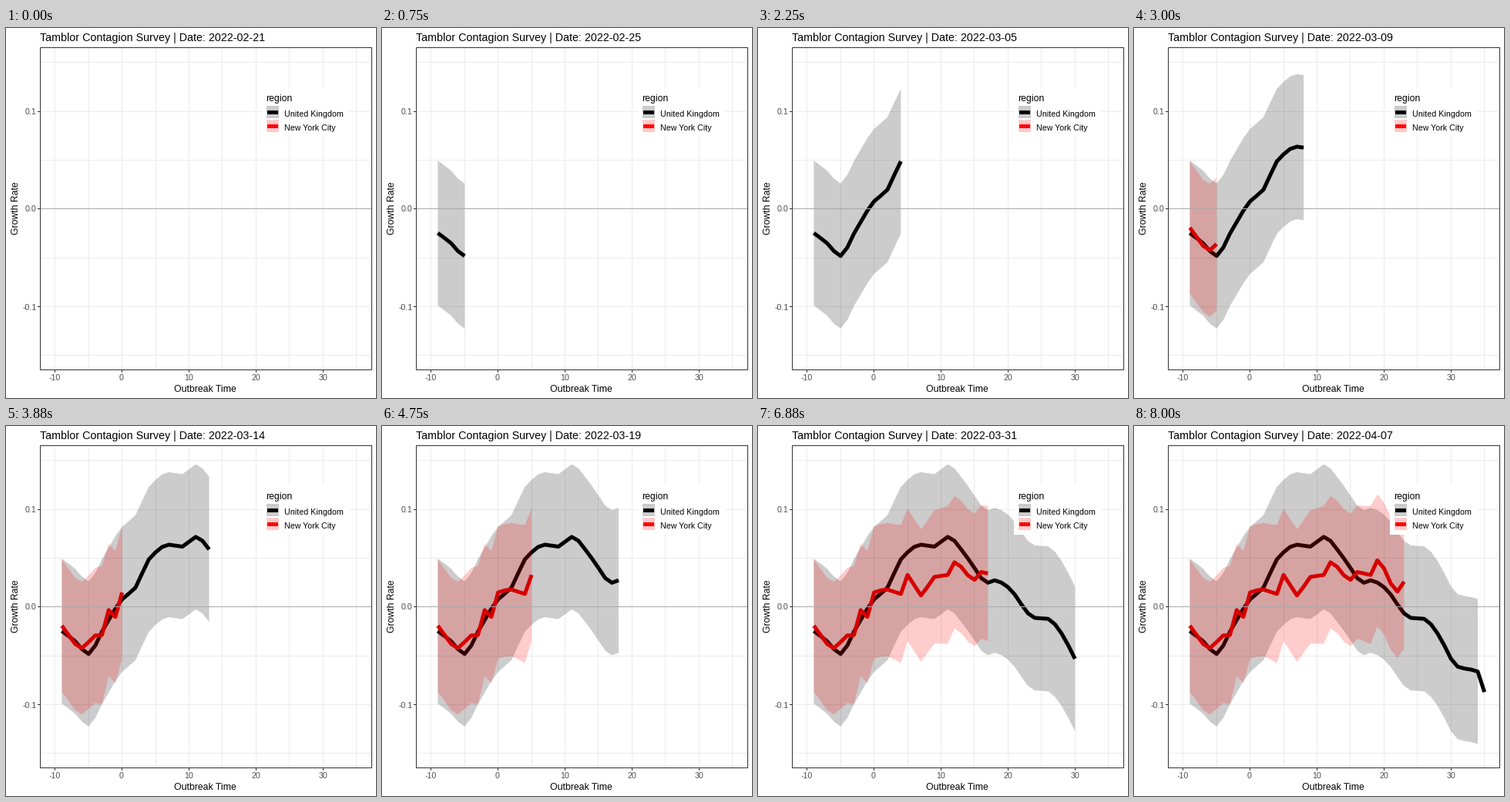
Animation, 480 px wide and 480 px high, one loop 8130 ms. Source, as a matplotlib script:

```python
import numpy as np
import matplotlib.pyplot as plt
from matplotlib.animation import FuncAnimation
from matplotlib.patches import Polygon, Rectangle

SIZE, DPI = 480, 96
PT = 72 / DPI  # points per pixel
LOOP, TICK, POSE = 8130, 30, 125  # ms
DAYS, LAST_POSE = 45, 64

plt.rcParams["font.family"] = "Liberation Sans"
plt.rcParams["path.snap"] = False

# Turning points as (outbreak time, growth rate in thousandths)
UK = [(-9, -24.5), (-7, -35), (-5, -48), (-3, -25), (0, 8), (2, 20), (4, 49),
      (7, 64), (9, 62), (11, 72), (14, 50), (17, 25), (18, 27.5), (20, 20.5),
      (24, -11), (26, -12), (28, -27), (31, -61), (34, -66), (35, -87)]
NYC = [(-9, -19), (-6, -42), (-4, -29), (-3, -28.5), (-2, -3), (-1, -10),
       (0, 15), (2, 18), (4, 13.5), (5, 33), (7, 12), (9, 31), (11, 33),
       (12, 46), (15, 28), (16, 36), (18, 33), (19, 48), (22, 16), (23, 26)]

# Each day lands on a whole pose; positions between are interpolated
DAY_POSE = np.round(np.arange(DAYS + 1) * LAST_POSE / DAYS)


def col(time):
    return 150.1 + 8.687 * time


def row(rate):
    return 234.5 - 1.266 * rate


def daily(keys):
    """Daily values of a monotone cubic through the turning points."""
    x, y = np.array(keys, float).T
    h = np.diff(x)
    slope = np.diff(y) / h
    a, b = slope[:-1], slope[1:]
    same = a * b > 0
    m = np.r_[slope[0], np.where(same, 2 * a * b / np.where(same, a + b, 1), 0),
              slope[-1]]
    t = np.arange(x[0], x[-1] + 1)
    i = np.clip(np.searchsorted(x, t, "right") - 1, 0, len(h) - 1)
    u = (t - x[i]) / h[i]
    ease = u * u * (3 - 2 * u)
    bend = u * (1 - u) * ((1 - u) * m[i] - u * m[i + 1]) * h[i]
    return t, y[i] + (y[i + 1] - y[i]) * ease + bend


fig = plt.figure(figsize=(SIZE / DPI, SIZE / DPI), dpi=DPI, facecolor="white")
ax = fig.add_axes([0, 0, 1, 1])
ax.set_xlim(-0.5, SIZE - 0.5)
ax.set_ylim(SIZE - 0.5, -0.5)
ax.axis("off")


def line(x, y, color, width=1, z=1):
    return ax.plot(x, y, color=color, lw=width * PT, zorder=z,
                   solid_capstyle="butt", solid_joinstyle="round")[0]


def box(x0, y0, x1, y1, z, **style):
    ax.add_patch(Rectangle((x0, y0), x1 - x0, y1 - y0, zorder=z, **style))


def text(x, y, s, size, color="black", z=9, **style):
    style.setdefault("va", "baseline")
    return ax.text(x, y, s, fontsize=size * PT, color=color, zorder=z, **style)


LEFT, TOP, RIGHT, BOTTOM = 44, 25, 474, 443
ZERO = 234

# Grid, axes and frame
for t in range(-10, 36, 5):
    x = round(col(t))
    line([x, x], [TOP, BOTTOM], "#EBEBEB")
    if t % 10 == 0:
        line([x, x], [BOTTOM, BOTTOM + 3.5], "#333333")
        text(x - 0.5, 456.7, str(t), 10.6, "#4D4D4D", ha="center")
for rate in range(-150, 151, 50):
    y = round(row(rate) - 0.1)
    line([LEFT, RIGHT], [y, y], "#EBEBEB")
    if rate % 100 == 0:
        line([LEFT - 3.5, LEFT], [y, y], "#333333")
        text(39, y + 4, f"{rate / 1000:.1f}", 10.6, "#4D4D4D", ha="right")
line([LEFT, RIGHT], [ZERO, ZERO], "#A9A9A9", z=6)
box(LEFT, TOP, RIGHT, BOTTOM, 7, fill=False, ec="#333333", lw=PT)
text(257.8, 471.8, "Outbreak Time", 12.2, ha="center")
text(12.8, 233.3, "Growth Rate", 12.2, ha="center", va="center", rotation=90)
title = text(43.5, 16.7, "", 14.25)

# Legend
box(331.5, 75.5, 444.5, 140.5, 8, fc="white", lw=0)
text(336.8, 94.7, "region", 12.3)
for y, label, key, color in ((109, "United Kingdom", "#CCCCCC", "black"),
                             (127, "New York City", "#FFCCCC", "red")):
    box(337.5, y - 8.5, 353.5, y + 7.5, 8.1, fc=key, lw=0)
    line([338.5, 352.5], [y, y], color, 5, 8.2)
    text(360.3, y + 5.2, label, 10.6)


class Series:
    def __init__(self, keys, half, first_day, last_band, color, z):
        self.times, self.rates = daily(keys)
        self.half = half(self.times)
        self.first_day, self.last_band = first_day, last_band
        self.curve = line([], [], color, 5, z)
        self.band = Polygon(np.zeros((3, 2)), fc=color, alpha=0.2, lw=0,
                            zorder=z + 2)
        ax.add_patch(self.band)

    def path(self, day, last):
        """Return the times shown so far, ending at a partial step."""
        end = min(self.times[0] + day - self.first_day, last)
        return np.append(self.times[self.times < end], end)

    def rows(self, rates, t):
        return row(np.interp(t, self.times, rates))

    def show(self, day):
        started = day > self.first_day
        self.curve.set_visible(started)
        self.band.set_visible(started)
        if not started:
            return
        t = self.path(day, self.times[-1])
        self.curve.set_data(col(t), self.rows(self.rates, t))
        t = self.path(day, self.last_band)
        upper = self.rows(self.rates + self.half, t)
        lower = self.rows(self.rates - self.half, t)
        self.band.set_xy(np.column_stack([
            np.append(col(t), col(t[::-1])), np.append(upper, lower[::-1])]))


def steady(t):
    return np.full(len(t), 74.3)


def weekly(t):
    return 67.8 + 3 * ((t + 9) % 7 / 6) ** 4


series = [Series(UK, steady, 0, 34, "black", 2),
          Series(NYC, weekly, 13, 23, "red", 2.5)]


def date_label(days):
    month, day = 2, 21 + days
    for length in (28, 31):
        if day > length:
            month, day = month + 1, day - length
        else:
            break
    return f"2022-{month:02d}-{day:02d}"


def update(n):
    # Poses are longer than ticks; one due within this tick shows at once
    pose = min((n * TICK + 20) // POSE, LAST_POSE)
    day = np.interp(pose, DAY_POSE, np.arange(DAYS + 1))
    for s in series:
        s.show(day)
    date = date_label(DAYS * pose // LAST_POSE)
    title.set_text(f"Tamblor Contagion Survey | Date: {date}")
    return []


anim = FuncAnimation(fig, update, frames=LOOP // TICK, interval=TICK,
                     init_func=lambda: update(0), repeat=True, repeat_delay=0)
plt.show()
```
